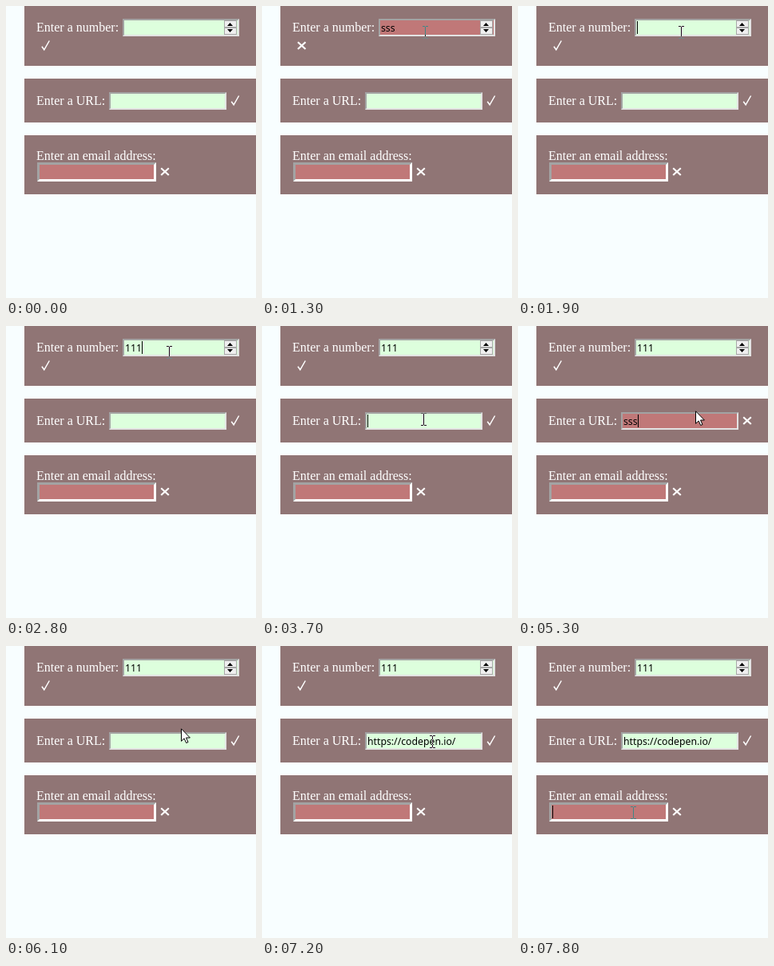
An HTML page for the animation above (8 s loop, 313x366 px).

```html
<!DOCTYPE html>
<html lang="en">
<head>
<meta charset="utf-8">
<title>Form validation</title>
<style>
  html, body { margin: 0; width: 100%; height: 100%; overflow: hidden; background: #f8feff; }
  svg { display: block; width: 313px; height: 366px; isolation: isolate; }
  text { white-space: pre; }
  .label { font: 16px "Liberation Serif", "Times New Roman", serif; fill: #fff; }
  .value { font: 12.25px "Noto Sans", "Open Sans", sans-serif; fill: #000; }
  .mark { fill: none; stroke: #fff; }
  .beam { fill: #fff; mix-blend-mode: difference; }
</style>
</head>
<body>
<svg id="stage" viewBox="0 0 313 366" xmlns="http://www.w3.org/2000/svg"></svg>
<script>
const LOOP = 8000;
const GREEN = '#ddffdd', RED = '#c07878';
const stage = document.getElementById('stage');

function add(tag, attrs, text) {
  const el = document.createElementNS('http://www.w3.org/2000/svg', tag);
  for (const key in attrs) el.setAttribute(key, attrs[key]);
  if (text) el.textContent = text;
  return stage.appendChild(el);
}

function rect(x, y, width, height, fill) {
  return add('rect', { x, y, width, height, fill, 'shape-rendering': 'crispEdges' });
}

function show(el, on) {
  el.setAttribute('visibility', on ? 'visible' : 'hidden');
}

// Inset-bordered input with its validity mark, value and caret
function makeField(x, y, w, h, border, light, markX, markY) {
  rect(x, y, w, h, light);
  add('path', {
    d: `M${x} ${y}h${w}l${-border} ${border}H${x + border}V${y + h - border}l${-border} ${border}z`,
    fill: '#a3a3a3'
  });
  const fill = rect(x + border, y + border, w - 2 * border, h - 2 * border, GREEN);
  const textX = x + border + 1;
  const value = add('text', { class: 'value', x: textX, y: y + 16 });
  const caret = rect(textX, y + border + 1, 1, 16, '#000');
  const at = `translate(${markX} ${markY})`;
  const check = add('path', { class: 'mark', transform: at, d: 'M-4.8 1.2L-1.9 5.3L4.6-6', 'stroke-width': 1.5 });
  const cross = add('path', { class: 'mark', transform: at, d: 'M-4.8-4.3L4.8 4.5M4.8-4.3L-4.8 4.5', 'stroke-width': 2.2 });

  return (text, caretAt, valid) => {
    fill.setAttribute('fill', valid ? GREEN : RED);
    value.textContent = text;
    show(caret, caretAt !== null);
    if (caretAt !== null) caret.setAttribute('x', textX + caretAt);
    show(check, valid);
    show(cross, !valid);
  };
}

// Last entry whose time has been reached
function current(list, t) {
  let found = list[0];
  for (const item of list) if (item[0] <= t) found = item;
  return found;
}

[[0, 75], [91, 55], [162, 74]].forEach(([y, h]) => rect(23, y, 290, h, '#907575'));
[['Enter a number:', 32], ['Enter a URL:', 124], ['Enter an email address:', 193]]
  .forEach(([text, y]) => add('text', { class: 'label', x: 38, y }, text));

const numberField = makeField(146, 16, 146, 22, 2, '#e3e3e3', 49.7, 49.5);
const urlField = makeField(129, 108, 147, 22, 2, '#e3e3e3', 287, 118.5);
const emailField = makeField(39, 196, 149, 24, 3, '#fff', 199, 207.5);

// Spinner buttons
[18, 27].forEach(y => {
  rect(273, y, 16, 9, '#a8a8a8');
  rect(274, y + 1, 14, 7, '#efefef');
});
add('path', { d: 'M277 25h7l-3.5-4zM277 29h7l-3.5 4z', fill: '#000' });

const beam = add('path', {
  class: 'beam', 'shape-rendering': 'crispEdges',
  d: 'M0 0h3v1h-3zM4 0h3v1h-3zM3 1h1v14h-1zM0 15h3v1h-3zM4 15h3v1h-3z'
});
const arrow = add('path', {
  d: 'M.5.8V16.3L4.1 12.9L6.7 18.5L9 17.5L6.5 12H11.4z',
  fill: '#fff', stroke: '#000', 'stroke-width': 1
});

// [time, text, caret offset or null]
const numberSteps = [
  [0, '', null], [400, '', 0], [600, 's', 6], [800, 'ss', 12], [900, 'sss', 18],
  [1300, 'sss', null], [1600, 'ss', 12], [1700, 's', 6], [1800, '', null],
  [1900, '', 0], [2300, '', null], [2400, '1', 7], [2600, '11', 14],
  [2700, '111', null], [2800, '111', 21], [3200, '111', null]
];
const urlSteps = [
  [0, '', null], [3700, '', 0], [4200, 's', 6], [4500, 'ss', 12], [4700, 'ss', null],
  [4800, 'sss', 18], [5600, 'sss', null], [5800, 'ss', 12], [5900, 's', 6],
  [6100, '', null], [6500, '', 0], [6600, 'https://codepen.io/', 110],
  [7100, 'https://codepen.io/', null]
];

// [time, pointer kind, x, y]
const pointerSteps = [
  [0, '', 0, 0], [100, 'beam', 211, 25], [200, 'beam', 201, 25],
  [3300, 'arrow', 203, 45], [3400, 'arrow', 203, 72], [3500, 'beam', 200, 103],
  [3600, 'beam', 199, 109], [4600, 'beam', 199, 107], [4700, 'beam', 199, 104],
  [4800, 'arrow', 214, 99], [4900, 'arrow', 250, 94], [5000, 'arrow', 278, 97],
  [5100, 'arrow', 268, 102], [5200, 'arrow', 243, 105], [5300, 'arrow', 222, 106],
  [5400, 'arrow', 219, 103], [7200, 'beam', 210, 112], [7300, 'arrow', 195, 138],
  [7400, 'arrow', 175, 166], [7500, 'arrow', 158, 186], [7600, 'beam', 144, 199],
  [7700, 'beam', 141, 201]
];

function draw(t) {
  const [, num, numCaret] = current(numberSteps, t);
  const [, url, urlCaret] = current(urlSteps, t);
  const [, kind, x, y] = current(pointerSteps, t);
  numberField(num, numCaret, !num.startsWith('s'));
  urlField(url, urlCaret, !url.startsWith('s'));
  emailField('', t >= 7800 ? 0 : null, false);
  show(beam, kind === 'beam');
  show(arrow, kind === 'arrow');
  (kind === 'beam' ? beam : arrow).setAttribute('transform', `translate(${x} ${y})`);
}

const start = performance.now();
function frame() {
  draw((performance.now() - start) % LOOP);
  requestAnimationFrame(frame);
}
frame();
</script>
</body>
</html>
```
